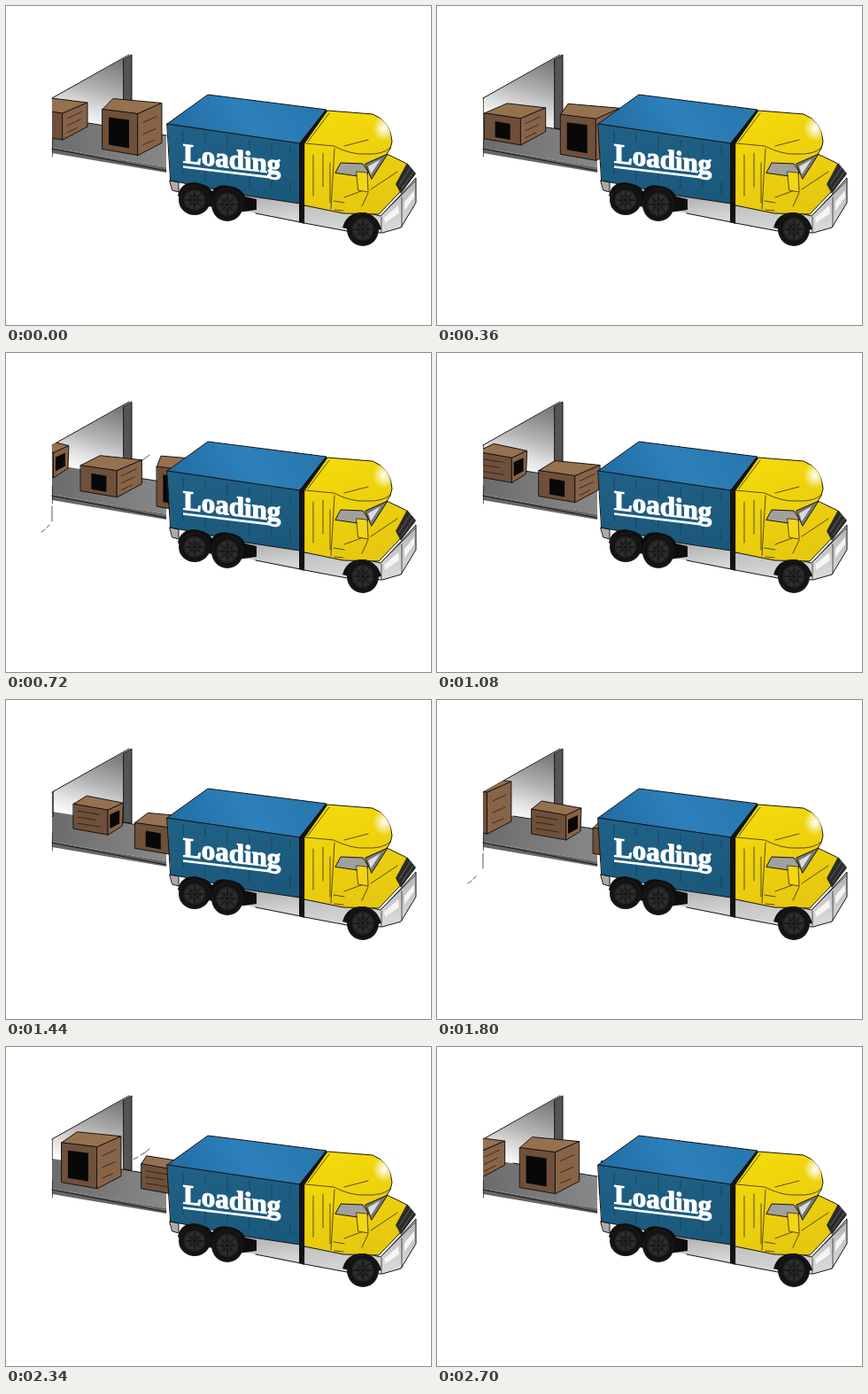
Write an HTML page that moves like this. It is 480 px wide and 360 px high and loops after 2.88 s.

```html
<!DOCTYPE html>
<html lang="en">
<head>
<meta charset="utf-8">
<title>Loading</title>
<style>
html, body { margin: 0; width: 100%; height: 100%; overflow: hidden; background: #fff; }
svg { display: block; width: 480px; height: 360px; }
.ink { stroke: #161412; stroke-width: 1; stroke-linejoin: round; stroke-linecap: round; }
.thin { fill: none; stroke: #191510; stroke-width: .7; stroke-linecap: round; }
text { font: bold 31px "Liberation Serif", "Noto Serif", serif; fill: #fff; stroke: #fff; stroke-width: 1.2; }
</style>
</head>
<body>
<svg viewBox="0 0 480 360">
  <defs>
    <linearGradient id="wall" x1=".8" y1="0" x2=".5" y2="1">
      <stop offset="0" stop-color="#777"/><stop offset=".45" stop-color="#b2b2b2"/><stop offset=".75" stop-color="#e2e2e2"/><stop offset="1" stop-color="#fff"/>
    </linearGradient>
    <linearGradient id="belt"><stop offset="0" stop-color="#6c6c6c"/><stop offset="1" stop-color="#888"/></linearGradient>
    <linearGradient id="roof" x1="0" y1=".6" x2="1" y2=".4">
      <stop offset="0" stop-color="#216ca3"/><stop offset=".5" stop-color="#2d80ba"/><stop offset="1" stop-color="#2877ae"/>
    </linearGradient>
    <linearGradient id="side" x2=".2" y2="1"><stop offset="0" stop-color="#206187"/><stop offset="1" stop-color="#1b597c"/></linearGradient>
    <linearGradient id="cab" x2=".4" y2="1"><stop offset="0" stop-color="#f5dc0a"/><stop offset="1" stop-color="#e6c810"/></linearGradient>
    <linearGradient id="steel" y2="1" x2=".2"><stop offset="0" stop-color="#aaa"/><stop offset="1" stop-color="#d8d8d8"/></linearGradient>
    <radialGradient id="shine"><stop offset="0" stop-color="#fff"/><stop offset="1" stop-color="#fff" stop-opacity="0"/></radialGradient>
    <radialGradient id="tyre">
      <stop offset="0" stop-color="#555"/><stop offset=".25" stop-color="#222"/><stop offset=".55" stop-color="#303030"/><stop offset=".75" stop-color="#111"/><stop offset="1" stop-color="#171717"/>
    </radialGradient>
    <clipPath id="bay"><path d="M52 104 139 55H240V240H52Z"/></clipPath>
  </defs>

  <!-- loading bay -->
  <path d="M52 104 133 59V138L52 127Z" fill="url(#wall)"/>
  <path d="M52 126 181 146V182L52 160Z" fill="url(#belt)"/>
  <path d="M52 160 181 182V188L52 166Z" fill="#666"/>
  <path class="ink" d="M52 161 181 186M86 131 181 146" fill="none"/>
  <path class="ink" d="M133 60 142 55V139L133 138Z" fill="#555"/>
  <path class="ink" d="M52 104 139 55" fill="none"/>
  <path class="thin" d="M52.4 104V127M52.4 150V170"/>
  <path class="thin" id="scrap"/>
  <path class="thin" id="dash" d="M144 127 149 124M152 122 157 119 162 115"/>
  <g id="boxes" clip-path="url(#bay)"></g>

  <!-- container -->
  <path class="ink" d="M185 197 195 199V210L188 208Z" fill="#aaa"/>
  <path d="M268 211 333 222V245L268 231Z" fill="url(#steel)"/>
  <path class="ink" d="M282 234 333 244" fill="none"/>
  <path class="ink" d="M182 133 228 100 362 117 333 155Z" fill="url(#roof)"/>
  <path class="ink" d="M182 133 332 155 332 223 272 214 186 197Z" fill="url(#side)"/>
  <path d="M331 155 361 117 365 119 337 157V246L331 244Z" fill="#131313"/>
  <path class="thin" id="ribs" opacity=".5"/>
  <g transform="matrix(1 .12 0 1 200 176.5)">
    <text>Loading</text>
    <path d="M0 5H97" stroke="#fff" stroke-width="2.6"/>
  </g>
  <path d="M194 214Q197 199 213 199 228 201 233 209 238 200 252 203 266 205 270 215L283 218V230L262 233 200 220Z" fill="#0e0e0e"/>

  <!-- cab -->
  <path class="ink" d="M337 225 402 232 423 237 446 213 463 194V222L446 250 425 256 385 254 337 245Z" fill="url(#steel)"/>
  <path class="ink" d="M337 155 363 118 414 122Q435 130 436 153 435 162 430 167L451 177 462 190 443 212 421 235 381 234 337 225Z" fill="url(#cab)"/>
  <ellipse cx="427" cy="138" rx="13" ry="15" fill="url(#shine)"/>
  <path class="thin" d="M338 155 370 158Q390 168 406 167 426 168 434 160M371 161 367 229M365 121 341 153M382 158 409 151M347 168V214M358 166V204M366 177V222M370 220 382 222M371 230 381 231M382 216 409 206M412 207 442 187M409 211 402 226"/>
  <path class="ink" d="M372 188 378 177 403 178 409 187 407 193Z" fill="#a0a0a0"/>
  <path class="ink" d="M406 178 431 167 413 195Z" fill="#777"/>
  <path d="M409 181 423 173 412 190Z" fill="#ddd"/>
  <path class="thin" d="M396 187 408 188 409 210 398 208Z" style="fill:#f3d514"/>
  <path d="M440 201 453 177 463 189 446 212Z" fill="#2b2b2b"/>
  <path d="M444 202 457 182M447 206 460 187" stroke="#777" stroke-width=".7"/>
  <path class="thin" d="M424 236 446 214 462 198M447 216V249M424 238V255"/>
  <path d="M427 239 443 225 444 234 428 245ZM450 221 461 208V216L450 231Z" fill="#f4f4f4"/>
  <path d="M380 250Q385 233 402 233 419 234 424 252L402 256Z" fill="#0e0e0e"/>
  <g id="wheels"></g>
</svg>
<script>
const byId = id => document.getElementById(id);
const STEP = 180, COUNT = 16, SPEED = 15.35, SPAN = SPEED * COUNT, SLOPE = 0.19;

// x: start, y: height at x = 0; face points are relative to the upper left corner
const boxes = [
  { x: 109, y: 95.8, apex: [13, -12], rim: "67-7 40 5", left: "0 0 40 5 40 52 0 45", right: "40 5 67-7 67 38 40 52",
    mark: "7 9 30 12 30 44 7 40", grain: "M46 15 61 8M46 28 60 22M46 40 58 35" },
  { x: 23, y: 110.7, apex: [20, -11], rim: "69-6 41 6", left: "0 0 41 6 41 36 0 29", right: "41 6 69-6 69 21 41 36",
    mark: "12 9 29 12 29 30 12 27", grain: "M46 12 63 4M46 20 61 13M46 28 58 22" },
  { x: -46.5, y: 102.7, apex: [12, -9], rim: "56-1 39 7", left: "0 0 39 7 39 35 0 28", right: "39 7 56-1 55 25 39 35",
    mark: "41 12 52 7 52 22 41 28", grain: "M5 8 29 12M5 15 25 18M5 22 30 26" }
];

const face = (points, fill) => `<polygon class="ink" points="${points}" fill="${fill}"/>`;
byId("boxes").innerHTML = boxes.map(b => "<g>" +
  face("", "#967150") + face(b.left, "#6f503a") + face(b.right, "#876348") +
  `<polygon points="${b.mark}" fill="#080808"/><path class="thin" d="${b.grain}"/></g>`).join("");
const crates = [...byId("boxes").children];

byId("ribs").setAttribute("d", [200, 225, 250, 275, 300, 321].map((x, i) => {
  const y = 133 + (x - 182) * 0.145;
  return `M${x} ${y + 5}v${i % 2 ? 9 : 14}M${x} ${y + 46}v${i % 2 ? 13 : 8}`;
}).join(""));

byId("wheels").innerHTML = [[213, 219, 18, 17], [250, 224, 18, 19], [403, 252, 18, 19]].map(([x, y, rx, ry]) => {
  let spokes = "";
  for (let a = 0; a < 6.2; a += Math.PI / 4)
    spokes += `M${x} ${y}l${Math.cos(a) * rx * 0.6} ${Math.sin(a) * ry * 0.6}`;
  return `<ellipse cx="${x}" cy="${y}" rx="${rx}" ry="${ry}" fill="url(#tyre)"/>` +
    `<path d="${spokes}" stroke="#0c0c0c"/>`;
}).join("");

const scraps = { 4: 40, 9: 40, 10: 35, 11: 35, 12: 40 };

function draw(now) {
  const step = Math.floor(now / STEP) % COUNT;
  boxes.forEach((b, i) => {
    const x = (b.x + step * SPEED + 56 + SPAN) % SPAN - 56;
    // the far corner drifts back as the view angle changes
    const apex = b.apex[0] - (x - 100) * 0.12;
    crates[i].firstChild.setAttribute("points", `0 0 ${apex} ${b.apex[1]} ${b.rim}`);
    crates[i].setAttribute("transform", `translate(${x} ${b.y + x * SLOPE})`);
  });
  const end = scraps[step];
  byId("scrap").setAttribute("d", end ? `M52 173V190M${end} ${242 - end}l4-3M${end + 6} ${237 - end}l3-3` : "");
  byId("dash").style.display = step === 4 || step === 13 ? "" : "none";
  requestAnimationFrame(draw);
}
draw(performance.now());
</script>
</body>
</html>
```
